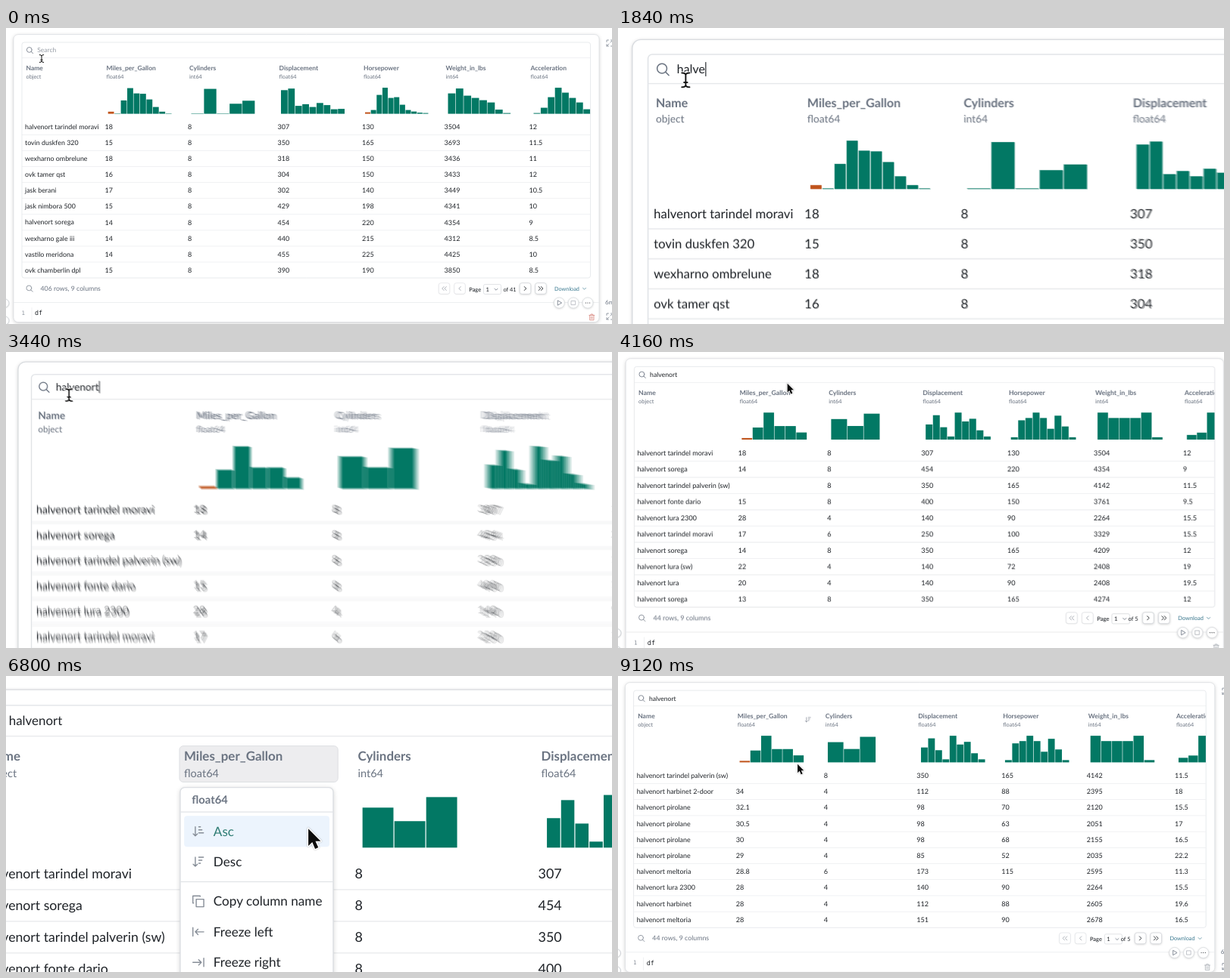
An HTML page with a canvas that plays this animation: 800x392 px, repeating every 9.2 s.

```html
<!DOCTYPE html>
<html lang="en">
<head>
<meta charset="utf-8">
<title>Searchable data table</title>
<style>
html, body { margin: 0; width: 100%; height: 100%; overflow: hidden; background: #fff; }
canvas { display: block; width: 100vw; height: 100vh; }
</style>
</head>
<body>
<canvas id="stage"></canvas>
<script>
const W = 800, H = 392, LOOP = 9200, STEP = 80, SHUTTER = 13;
const stage = document.getElementById('stage');
const layer = document.createElement('canvas');
const out = stage.getContext('2d');
const ctx = layer.getContext('2d');
const SANS = 'Lato, "Open Sans", sans-serif', MONO = '"DejaVu Sans Mono", monospace';
const GREEN = '#027864', ORANGE = '#c0541c', INK = '#1f2328', GRAY = '#6b7482', PALE = '#e6e8eb';
const QUERY = 'halvenort', ROW0 = 131, ROW = 21.06, BASE = 113.6;

const TITLES = ['Name', 'Miles_per_Gallon', 'Cylinders', 'Displacement', 'Horsepower', 'Weight_in_lbs', 'Acceleration'];
const TYPES = ['object', 'float64', 'int64', 'float64', 'float64', 'int64', 'float64'];

const split = s => s.trim().split('\n').map(r => r.split('|'));

// Histogram entry: start x, bar pitch, bar heights, first bar is "missing"
const all = {
  x: [25, 130.5, 240, 358.5, 470, 578.5, 690.5],
  total: '406', pages: '41', shift: 0,
  bars: [
    [134.7, 8.45, [2.8, .5, 17.7, 34, 27, 26.5, 19, 9, 2.8, .5], 1],
    [244.5, 16.9, [.5, 33, .5, 13.3, 17.3]],
    [363, 9.4, [31.3, 33.4, 10.5, 12.7, 9, 14.3, 11.5, 6, 6.5]],
    [474, 7.64, [2, 5, 25, 34.5, 21, 22, 12, 5, 3, 1.5, 1], 1],
    [583.5, 10.4, [27, 33.5, 24, 21, 18, 15, 5.5, 1]],
    [696.5, 9.4, [1, 8, 22, 34.5, 28, 21, 15, 6, 1]]
  ],
  rows: split(`
halvenort tarindel moravi|18|8|307|130|3504|12
tovin duskfen 320|15|8|350|165|3693|11.5
wexharno ombrelune|18|8|318|150|3436|11
ovk tamer qst|16|8|304|150|3433|12
jask berani|17|8|302|140|3449|10.5
jask nimbora 500|15|8|429|198|4341|10
halvenort sorega|14|8|454|220|4354|9
wexharno gale iii|14|8|440|215|4312|8.5
vastilo meridona|14|8|455|225|4425|10
ovk chamberlin dpl|15|8|390|190|3850|8.5`)
};
const found = {
  x: [25, 155.3, 270.5, 392, 503.3, 615, 730.5],
  total: '44', pages: '5', shift: 8,
  bars: [
    [160, 14.1, [2, 15.6, 35, 17.5, 17.5, 9.2], 1],
    [275.6, 21.1, [26.6, 17.6, 33.6]],
    [397.8, 9.4, [19.6, 31.6, 16, 4, 35, 23.5, 27, 12, 4]],
    [508, 9.4, [3, 25, 28, 35, 28, 14, 31, 17, 3]],
    [620, 14.1, [35, 28, 28, 28, 35, 3]],
    [735.5, 13, [6, 9, 35]]
  ],
  rows: split(`
halvenort tarindel moravi|18|8|307|130|3504|12
halvenort sorega|14|8|454|220|4354|9
halvenort tarindel palverin (sw)||8|350|165|4142|11.5
halvenort fonte dario|15|8|400|150|3761|9.5
halvenort lura 2300|28|4|140|90|2264|15.5
halvenort tarindel moravi|17|6|250|100|3329|15.5
halvenort sorega|14|8|350|165|4209|12
halvenort lura (sw)|22|4|140|72|2408|19
halvenort lura|20|4|140|90|2408|19.5
halvenort sorega|13|8|350|165|4274|12`)
};
const sorted = { ...found, rows: split(`
halvenort tarindel palverin (sw)||8|350|165|4142|11.5
halvenort harbinet 2-door|34|4|112|88|2395|18
halvenort pirolane|32.1|4|98|70|2120|15.5
halvenort pirolane|30.5|4|98|63|2051|17
halvenort pirolane|30|4|98|68|2155|16.5
halvenort pirolane|29|4|85|52|2035|22.2
halvenort meltoria|28.8|6|173|115|2595|11.3
halvenort lura 2300|28|4|140|90|2264|15.5
halvenort harbinet|28|4|112|88|2605|19.6
halvenort meltoria|28|4|151|90|2678|16.5`) };

// Times of the interactions
const FOCUS = 400, TYPE = 1310, KEY = 125, FILTER = 2720, ARROW = 3760,
      HOVER = 4480, OPEN = 5440, PICK = 7300;

// Pointer path: time, x, y
const PATH = [
  [0, 47, 40.5], [800, 47.4, 37], [2960, 47.4, 37], [3440, 52, 36], [4160, 219, 41],
  [4640, 240, 55], [5500, 243, 57], [5840, 244, 78], [6400, 239.7, 101],
  [6880, 239.7, 101], [7120, 240, 122], [7360, 240, 122], [7760, 236, 116], [LOOP, 236, 116]
];

function pointer(t) {
  const i = Math.max(1, PATH.findIndex(k => k[0] >= t));
  const [t0, x0, y0] = PATH[i - 1], [t1, x1, y1] = PATH[i];
  const u = (t - t0) / (t1 - t0), e = u * u * (3 - 2 * u);
  return [x0 + (x1 - x0) * e, y0 + (y1 - y0) * e];
}

// Critically damped spring from 0 to 1
function spring(ms) {
  const x = Math.max(0, ms) * .0061;
  return 1 - (1 + x) * Math.exp(-x);
}

function camera(t) {
  const a = spring(t - 1230) - spring(t - 3214);
  const b = spring(t - 5668) - spring(t - 7960);
  return { s: 1 + a + b, x: -79 * b, y: b - a };
}

function text(s, x, y, size, color, weight = 400, family = SANS) {
  ctx.font = `${weight} ${size}px ${family}`;
  ctx.fillStyle = color;
  ctx.fillText(s, x, y + size * .35);
}

function rect(x, y, w, h, color) {
  ctx.fillStyle = color;
  ctx.fillRect(x, y, w, h);
}

function box(x, y, w, h, r, fill, line, shadow = 0, lw = .7) {
  ctx.beginPath();
  ctx.roundRect(x, y, w, h, r);
  ctx.save();
  if (shadow) {
    ctx.shadowColor = 'rgba(0,0,0,.2)';
    ctx.shadowBlur = shadow;
    ctx.shadowOffsetY = shadow / 4;
  }
  if (fill) { ctx.fillStyle = fill; ctx.fill(); }
  ctx.restore();
  if (line) { ctx.strokeStyle = line; ctx.lineWidth = lw; ctx.stroke(); }
}

function icon(x, y, d, color = GRAY, lw = .8) {
  ctx.save();
  ctx.translate(x, y);
  ctx.strokeStyle = color;
  ctx.lineWidth = lw;
  ctx.lineCap = ctx.lineJoin = 'round';
  ctx.stroke(new Path2D(d));
  ctx.restore();
}

const ICON = {
  search: 'M2.8 -.6A3.4 3.4 0 1 1 -4 -.6A3.4 3.4 0 1 1 2.8 -.6M1.9 1.9L4.2 4.2',
  down: 'M-2 -1L0 1L2 -1',
  right: 'M-1.2 -2.5L1.2 0L-1.2 2.5',
  left: 'M1.2 -2.5L-1.2 0L1.2 2.5',
  rights: 'M-2.8 -2.5L-.4 0L-2.8 2.5M.4 -2.5L2.8 0L.4 2.5',
  lefts: 'M2.8 -2.5L.4 0L2.8 2.5M-.4 -2.5L-2.8 0L-.4 2.5',
  trash: 'M-3.5 -2.6H3.5M-1.3 -2.6V-4H1.3V-2.6M-2.7 -2.6V3.8H2.7V-2.6M-.9 -.8V2.2M.9 -.8V2.2',
  expand: 'M1 -1L4 -4M1.5 -4H4V-1.5M-1 1L-4 4M-4 1.5V4H-1.5M-4 -1.5V-4H-1.5M4 1.5V4H1.5',
  asc: 'M-2 -3V3M-3.4 1.6L-2 3L-.6 1.6M.3 -3H1.4M.3 -1H2.4M.3 1H3.4',
  desc: 'M-2 -3V3M-3.4 1.6L-2 3L-.6 1.6M.3 -3H3.4M.3 -1H2.4M.3 1H1.4',
  copy: 'M-1.4 -1.4H3.6V3.6H-1.4ZM-3.2 1.2H-3.6V-3.6H1.2V-3.2',
  freezeL: 'M-3.6 -2.8V2.8M3.6 0H-2M-.2 -1.8L-2 0L-.2 1.8',
  freezeR: 'M3.6 -2.8V2.8M-3.6 0H2M.2 -1.8L2 0L.2 1.8',
  wrap: 'M-3.4 -2.6H3.4M-3.4 0H2A1.4 1.4 0 0 1 2 2.8H.2M1.2 1.8L.2 2.8L1.2 3.8M-3.4 2.8H-1.6',
  format: 'M-1.5 -3.2L-2.2 3.2M1.8 -3.2L1.1 3.2M-3 -1.2H3M-3.2 1.2H2.8',
  filter: 'M-3.4 -3.2H3.4L.8 0V3.2L-.8 2.4V0Z'
};

function histogram([x, pitch, heights, missing]) {
  heights.forEach((h, i) =>
    rect(x + i * pitch, BASE - h, pitch - .6, h, missing && !i ? ORANGE : GREEN));
}

function card() {
  box(10, 8.6, 773, 381, 6, '#fff', '#d9dce0', 5);
  rect(10, 363, 773, .7, PALE);
  icon(797, 20, ICON.expand, GRAY, .7);
  icon(797, 382, ICON.expand, GRAY, .7);
  text('6ms', 791, 363, 8, GRAY);
  for (const y of [364, 387]) box(-7, y - 5, 11, 11, 5.5, '#fff', '#bfc4ca', 2);
}

function searchBar(t) {
  box(21, 19, 750.5, 312, 3, '#fff', '#dfe2e6');
  icon(31.4, 29.5, ICON.search, GRAY);
  const n = Math.max(0, Math.min(QUERY.length, Math.floor((t - TYPE) / KEY) + 1));
  const typed = QUERY.slice(0, n);
  text(typed || 'Search', 41.2, 29.4, 8.5, typed ? INK : '#979da6');
  if (t >= FOCUS && t < ARROW) {
    rect(41.4 + (n ? ctx.measureText(typed).width : 0), 24.4, .6, 10, INK);
  }
  rect(21, 39.2, 750.5, .6, PALE);
}

function table(t, view) {
  ctx.save();
  ctx.beginPath();
  ctx.rect(21, 39, 750.2, 292);
  ctx.clip();
  if (t >= HOVER && t < PICK) box(154.3, 46, 105, 24, 2.5, '#ededef', '#dddfe2', 0, .5);
  TITLES.forEach((title, i) => {
    const x = view.x[i] + (i ? 2 : 1.5);
    text(title, x, 53, 8.5, GRAY, 700);
    text(TYPES[i], x, 64.4, 7.3, GRAY);
  });
  view.bars.forEach(histogram);
  if (view === sorted) icon(249.6, 57.5, ICON.desc, GRAY, .6);
  view.rows.forEach((row, r) => {
    const y = ROW0 + r * ROW;
    row.forEach((v, i) => text(v, view.x[i], y, i ? 9 : 8.9, INK));
    if (r < 9) rect(21, y + ROW / 2 - .3, 750, .6, PALE);
  });
  ctx.restore();
}

function pageButton(x, d, on) {
  box(x - 7.3, 337.7, 14.6, 14.6, 3, '#fff', on ? '#cdd1d6' : '#e2e4e8', on ? 3 : 1);
  icon(x, 345, d, on ? INK : '#a6abb3', .9);
}

function footer(view) {
  const k = view.shift;
  icon(31, 345, ICON.search, GRAY, .7);
  text(`${view.total} rows, 9 columns`, 45.5, 345, 8.75, GRAY);
  pageButton(578.5 + k, ICON.lefts);
  pageButton(599 + k, ICON.left);
  text('Page', 611.3 + k, 346, 7.4, INK, 500);
  box(630.5 + k, 339.5, 23, 13, 2, '#fff', '#d6d9dd');
  text('1', 633.5 + k, 346, 7.6, INK);
  icon(647 + k, 346.2, ICON.down, GRAY);
  text(`of ${view.pages}`, 656.5 + k * .4, 346, 7.4, INK);
  pageButton(685.5, ICON.right, true);
  pageButton(706, ICON.rights, true);
  text('Download', 724, 345, 7.3, '#39788f');
  icon(763.5, 345.2, ICON.down, '#39788f', .7);
}

function codeCell(t) {
  for (const x of [730.3, 749, 768]) box(x - 7, 357, 14, 14, 7, '#fff', '#d5d8dc', 3);
  icon(730.6, 364, 'M-2 -3L3 0L-2 3Z', GRAY);
  icon(749, 364, 'M-2.6 -2.6H2.6V2.6H-2.6Z', '#a6abb3', .7);
  icon(768, 364, 'M-2.6 0h.01M0 0h.01M2.6 0h.01', INK, 1.2);
  text('1', 20.5, 377, 7.5, '#8b929c', 400, MONO);
  rect(33.7, 370, .6, 17, PALE);
  text('df', 38, 377, 8.4, INK, 400, MONO);
  icon(773.3, 383, ICON.trash, t < 240 ? '#d98a80' : '#aeb3ba', .8);
}

// Menu entry: y, icon, label, has submenu
const MENU = [
  [102.8, 'asc', 'Asc'], [123, 'desc', 'Desc'], [149.3, 'copy', 'Copy column name'],
  [169.6, 'freezeL', 'Freeze left'], [189.9, 'freezeR', 'Freeze right'],
  [210.4, 'wrap', 'Wrap text'], [231, 'format', 'Format', 1], [257, 'filter', 'Filter', 1]
];

function menu(t) {
  const [, py] = pointer(t);
  box(154.8, 73.6, 101.4, 196, 3, '#fff', '#dcdfe3', 6);
  text('float64', 162.5, 81.7, 7.4, GRAY, 700);
  for (const y of [89.6, 136, 244]) rect(155, y, 101, .6, '#dfe2e6');
  for (const [y, name, label, sub] of MENU) {
    const hot = Math.abs(py - y) < 10.2;
    if (hot) box(157.4, y - 10.3, 96.3, 20.6, 2, '#ecf4fd');
    icon(166.8, y, ICON[name], '#868d97', .7);
    text(label, 176.8, y, 8.6, hot ? '#2f7d74' : INK);
    if (sub) icon(244.7, y, ICON.right, GRAY, .8);
  }
}

function drawPointer(t) {
  const [x, y] = pointer(t);
  if (t < ARROW) {
    const beam = 'M-2.7 -5Q0 -5 0 -3.4Q0 -5 2.7 -5M0 -3.4V3.4M-2.7 5Q0 5 0 3.4Q0 5 2.7 5M-1.2 1.7H1.2';
    icon(x, y, beam, '#fff', 2.2);
    icon(x, y, beam, '#111', 1);
    return;
  }
  const p = new Path2D('M0 0V11.4L2.6 9L4.5 13.4L6.6 12.5L4.7 8.3H8.2Z');
  ctx.save();
  ctx.translate(x, y);
  ctx.shadowColor = 'rgba(0,0,0,.3)';
  ctx.shadowBlur = 2;
  ctx.strokeStyle = '#fff';
  ctx.lineWidth = 1.5;
  ctx.lineJoin = 'round';
  ctx.stroke(p);
  ctx.shadowColor = 'transparent';
  ctx.fillStyle = '#0c0c0c';
  ctx.fill(p);
  ctx.restore();
}

function scene(t, c) {
  const { width: w, height: h } = layer, kx = w / W, ky = h / H;
  ctx.setTransform(1, 0, 0, 1, 0, 0);
  rect(0, 0, w, h, '#fff');
  ctx.setTransform(kx * c.s, 0, 0, ky * c.s, kx * c.x, ky * c.y);
  ctx.textRendering = 'geometricPrecision';
  const view = t < FILTER ? all : t < PICK ? found : sorted;
  card();
  searchBar(t);
  table(t, view);
  footer(view);
  codeCell(t);
  if (t >= OPEN && t < PICK) menu(t);
  drawPointer(t);
}

function resize() {
  const ratio = window.devicePixelRatio || 1;
  const w = Math.round(innerWidth * ratio), h = Math.round(innerHeight * ratio);
  if (stage.width === w && stage.height === h) return;
  stage.width = layer.width = w;
  stage.height = layer.height = h;
}

// Motion blur: average several camera positions inside one shutter time
function render(t) {
  resize();
  const speed = Math.abs(camera(t + SHUTTER / 2).s - camera(t - SHUTTER / 2).s);
  const n = speed * W < 1 ? 1 : 9;
  for (let i = 0; i < n; i++) {
    const offset = n > 1 ? (i / (n - 1) - .5) * SHUTTER : 0;
    scene(t, camera(t + offset));
    out.globalAlpha = 1 / (i + 1);
    out.drawImage(layer, 0, 0);
  }
}

const start = performance.now();
let shown = -1;
function tick() {
  const t = Math.floor((performance.now() - start) % LOOP / STEP) * STEP;
  if (t !== shown) render(shown = t);
  requestAnimationFrame(tick);
}
tick();
</script>
</body>
</html>
```
